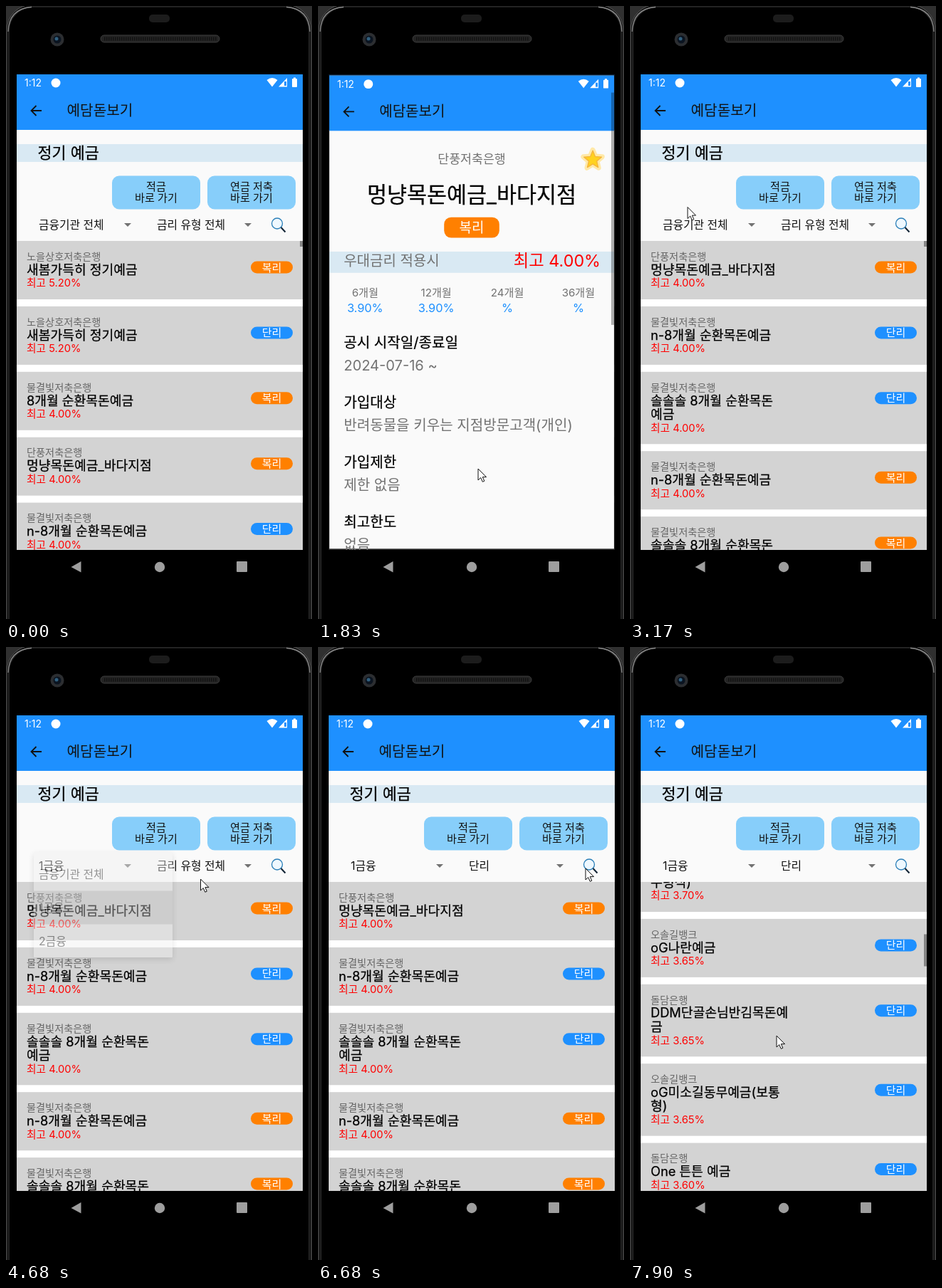
These frames come from a looping animation (430 px wide and 861 px high, 7990 ms). An HTML page:

```html
<!DOCTYPE html>
<html lang="ko">
<head>
<meta charset="utf-8">
<style>
html, body { margin: 0; width: 100%; height: 100%; overflow: hidden; background: #000 }
body > svg { display: block; width: 100%; height: 100% }
text { font-family: Inter, "Noto Sans CJK KR", "Noto Sans CJK", sans-serif; white-space: pre }
text[fill="#000"] { stroke: #000; stroke-width: .25px }
.popup { filter: drop-shadow(0 3px 4px #0004) }
</style>
</head>
<body>
<script>
const BLUE = '#1e90ff', ORANGE = '#ff8000', BAND = '#d9e9f3', GRAY = '#727272', DARK = '#111';
const LOOP = 7990, REST = 7900;

// ---- drawing helpers (y of a text is its visual middle) ----
const text = (x, y, size, str, fill = '#000', anchor = 'start') =>
  `<text x="${x}" y="${y + size * .37}" font-size="${size}" fill="${fill}" text-anchor="${anchor}">${str}</text>`;
const mid = (x, y, size, str, fill) => text(x, y, size, str, fill, 'middle');
const rect = (x, y, w, h, fill, r = 0, more = '') =>
  `<rect x="${x}" y="${y}" width="${w}" height="${h}" rx="${r}" fill="${fill}" ${more}/>`;
const path = (d, fill, more = '') => `<path d="${d}" fill="${fill}" ${more}/>`;
const circle = (x, y, r, fill, more = '') => `<circle cx="${x}" cy="${y}" r="${r}" fill="${fill}" ${more}/>`;
const group = (id, body, more = '') => `<g id="${id}" ${more}>${body}</g>`;

// ---- lists: bank, title lines, rate, compound interest? ----
const listA = [
  ['노을상호저축은행', '새봄가득히 정기예금', '5.20', 1],
  ['노을상호저축은행', '새봄가득히 정기예금', '5.20', 0],
  ['물결빛저축은행', '8개월 순환목돈예금', '4.00', 1],
  ['단풍저축은행', '멍냥목돈예금_바다지점', '4.00', 1],
  ['물결빛저축은행', 'n-8개월 순환목돈예금', '4.00', 0],
  ['물결빛저축은행', '솔솔솔 8개월 순환목돈|예금', '4.00', 0],
  ['물결빛저축은행', 'n-8개월 순환목돈예금', '4.00', 1],
  ['물결빛저축은행', '솔솔솔 8개월 순환목돈|예금', '4.00', 1]
];
const listB = [
  ['여울은행', 'QK 든든목돈예금', '3.90', 0],
  ['파랑은행', 'Lo바닷길목돈|예금', '3.85', 0],
  ['들꽃은행주식회사', 'QV네가Fresh푸른들판|예금', '3.80', 0],
  ['서리은행', 'W목돈예금|(만기수령식)', '3.75', 0],
  ['파랑은행', 'Lo새인연반김예금', '3.75', 0],
  ['여울은행', 'QK 246 목돈예금| (만기한번수령식)', '3.75', 0],
  ['서리은행', 'W새싹목돈예금|(만기한번|수령식)', '3.70', 0],
  ['오솔길뱅크', 'oG나란예금', '3.65', 0],
  ['돌담은행', 'DDM단골손님반김목돈예|금', '3.65', 0],
  ['오솔길뱅크', 'oG미소길동무예금(보통|형)', '3.65', 0],
  ['돌담은행', 'One 튼튼 예금', '3.60', 0]
];

function rows(list) {
  let y = 0;
  return list.map(([bank, title, rate, compound]) => {
    const lines = title.split('|'), extra = 19.5 * (lines.length - 1), top = y;
    y += 91.9 + extra;
    return rect(0, top, 402, 82 + extra, '#d3d3d3') +
      text(14, top + 21.5, 14.2, bank, '#666') +
      lines.map((s, i) => text(14, top + 40 + 19.5 * i, 18.2, s)).join('') +
      text(14, top + 59 + extra, 14.7, `최고 ${rate}%`, '#f00') +
      rect(329, top + 28.5, 59, 17, compound ? ORANGE : BLUE, 8.5) +
      mid(358.5, top + 37, 15, compound ? '복리' : '단리', '#fff');
  }).join('');
}

// ---- screen parts ----
const header = rect(15, 96, 402, 78, BLUE) +
  text(26, 108, 14, '1:12', '#fff') + circle(70, 108, 6.5, '#fff') +
  path('M366.500 104 Q374 98 381.500 104 L374 113.500Z M395 101 V113.500 H383Z', '#fff') +
  path('M391 106 H394 V112 H391Z', BLUE) +
  rect(402, 102, 7, 12, '#fff', 1) + rect(404, 100.5, 3, 2, '#fff') +
  path('M50 147 H36 M42.500 140 L35.500 147 L42.500 154', 'none', `stroke="${DARK}" stroke-width="1.8"`) +
  text(85.5, 146.5, 20.2, '예담돋보기', DARK);

const button = (x, top) => rect(x, 238.5, 124, 47, '#87cefa', 10) +
  mid(x + 62, 253, 15.1, top, DARK) + mid(x + 62, 269.5, 15.1, '바로 가기', DARK);
const arrow = x => path(`M${x - 5} 305 h10 l-5 5Z`, GRAY);

const home = rect(15, 96, 402, 668, '#fafafa') + header +
  rect(15, 194, 402, 25, BAND) + text(44.5, 206, 21.8, '정기 예금') +
  button(149, '적금') + button(283, '연금 저축') +
  text(46, 307, 15.8, '<tspan id="bank"></tspan>', DARK) + arrow(171) +
  text(212, 307, 15.8, '<tspan id="kind"></tspan>', DARK) + arrow(340) +
  circle(381, 305.5, 7.5, '#eef8ff', 'stroke="#2b7fb8" stroke-width="1.3"') +
  path('M386.500 311 L392.500 317.500', 'none', 'stroke="#123" stroke-width="2"') +
  `<svg x="15" y="330" width="402" height="434">` + rect(0, 0, 402, 434, '#fff') +
  group('listA', rows(listA)) + group('listB', rows(listB)) +
  rect(398, 0, 4, 8, '#858585', 0, 'id="thumb"') + '</svg>';

const star = (r, fill, more) => {
  const pts = Array.from({ length: 10 }, (_, i) => {
    const a = i * Math.PI / 5, d = i % 2 ? r * .45 : r;
    return (387 + d * Math.sin(a)).toFixed(1) + ',' + (215 - d * Math.cos(a)).toFixed(1);
  });
  return `<polygon points="${pts}" fill="${fill}" stroke-linejoin="round" ${more}/>`;
};
const rate = (i, value) => mid(65.5 + 100.4 * i, 402, 15.2, [6, 12, 24, 36][i] + '개월', GRAY) +
  mid(65.5 + 100.4 * i, 423.5, 16.4, value + '%', BLUE);
const fact = (i, label, value) => text(35.3, 472.7 + 84.4 * i, 20.2, label) +
  text(35.3, 505.3 + 84.4 * i, 20.2, value, GRAY);

const detail = rect(15, 96, 402, 668, '#fafafa') + header +
  mid(216, 213, 17.4, '단풍저축은행', GRAY) +
  star(14, '#ffe9a8', 'stroke="#ffe9a8" stroke-width="7"') + star(13, '#ffd21f', 'stroke="#f6b73c" stroke-width="1.5"') +
  mid(216, 263.7, 30.6, '멍냥목돈예금_바다지점') +
  rect(177, 296, 78, 29, ORANGE, 10) + mid(216, 310, 19, '복리', '#fff') +
  rect(15, 344.5, 402, 30, BAND) + text(35.3, 357, 20.1, '우대금리 적용시', GRAY) +
  text(398, 356.7, 23.5, '최고 4.00%', '#f00', 'end') +
  rate(0, '3.90') + rate(1, '3.90') + rate(2, '') + rate(3, '') +
  fact(0, '공시 시작일/종료일', '2024-07-16 ~') +
  fact(1, '가입대상', '반려동물을 키우는 지점방문고객(개인)') +
  fact(2, '가입제한', '제한 없음') + fact(3, '최고한도', '없음') +
  rect(413, 120, 4, 328, '#000', 0, 'id="pageThumb"');

const popup = (id, x, w, textX, options) => group(id,
  rect(x, 288, w, 148, '#f0f0f0', 1, 'class="popup"') +
  rect(x, 342.5, w, 47, '#0000002c', 0, `id="${id}Pick"`) +
  options.map((s, i) => text(textX, 319 + 47 * i, 15.8, s, DARK)).join(''));

const phone = rect(0, 0, 430, 861, '#303030') +
  rect(1, -2, 428, 900, '#0b0b0b', 36, 'stroke="#555" stroke-width="1"') +
  rect(4, 1, 422, 900, '#000', 34, 'stroke="#2c2c2c" stroke-width="1.5"') +
  path('M3 36 Q4 4 36 1.500 M427 36 Q426 4 394 1.500', 'none', 'stroke="#8a8a8a" stroke-width="1.3"') +
  rect(201, 12, 29, 11, '#1c1c1c', 5) +
  rect(133, 41, 167, 10, '#242424', 5, 'stroke="#3d3d3d"') +
  path('M138 46 H296', 'none', 'stroke="#111" stroke-width="5" stroke-dasharray="1.5 1.5"') +
  circle(72, 47, 9.5, '#2c2e31') + circle(72, 47, 5.5, '#0b1420') + circle(71, 46, 2.5, '#31607f') +
  path('M105.500 780 V795.500 L91.500 788Z', '#9e9e9e') + circle(216, 788, 7.2, '#9e9e9e') +
  rect(324, 780, 15, 15, '#9e9e9e', 1);

document.body.innerHTML = `<svg viewBox="0 0 430 861" preserveAspectRatio="none">
  <clipPath id="screen">${rect(15, 96, 402, 668, '#000')}</clipPath>
  ${phone}
  <g clip-path="url(#screen)">${home}
  ${rect(15, 96, 402, 668, '#000', 0, 'id="shade"')}${group('detail', detail)}
  ${popup('popA', 39, 195, 46, ['금융기관 전체', '1금융', '2금융'])}
  ${popup('popB', 204, 199, 212, ['금리 유형 전체', '단리', '복리'])}</g>
  ${group('cursor', path('M0 0 V16 L3.700 12.500 L6.300 18.300 L8.800 17.200 L6.300 11.600 H11.500Z', '#fff', 'stroke="#111" stroke-width="1"'))}
</svg>`;

// ---- motion ----
const $ = id => document.getElementById(id);
const ramp = (t, a, b) => Math.min(1, Math.max(0, (t - a) / (b - a)));
const smooth = p => p * p * (3 - 2 * p);
const drag = p => p ** 1.5;
const pulse = (t, inA, inB, outA, outB) => ramp(t, inA, inB) * (1 - ramp(t, outA, outB));
const show = (id, alpha) => $(id).setAttribute('opacity', alpha);
const move = (id, x, y) => $(id).setAttribute('transform', `translate(${x} ${y})`);

// time, x, y, easing towards this point
const route = [
  [440, 270, 834], [1220, 225, 650], [2260, 225, 650], [2620, 95, 775], [2760, 95, 775],
  [3170, 81, 282.5], [3240, 79, 291], [3310, 79, 293], [3390, 80, 302], [3720, 80, 302],
  [4300, 84, 366], [4430, 84, 366], [4680, 273.5, 326], [4760, 270, 308], [4960, 270, 308],
  [5400, 276, 440], [5560, 276, 444], [5860, 262, 366], [6080, 262, 366], [6540, 376, 311],
  [6760, 376, 311], [7200, 235, 597.5], [7380, 235, 597.5], [7550, 227, 373.5, drag],
  [7590, 227, 373.5], [7850, 206, 546]
];

function cursorAt(t) {
  const i = route.findIndex(k => k[0] > t);
  if (i < 0) return route.at(-1).slice(1);
  if (!i) return route[0].slice(1);
  const [t0, x0, y0] = route[i - 1], [t1, x1, y1, ease = smooth] = route[i];
  const p = ease(ramp(t, t0, t1));
  return [x0 + (x1 - x0) * p, y0 + (y1 - y0) * p];
}

// dragged by the pointer, then a decaying fling
function scrollB(t) {
  if (t < 7590) return 224 * drag(ramp(t, 7380, 7550));
  return 224 + 752 * (1 - Math.exp((7590 - t) / 300));
}

function draw(t) {
  const [x, y] = cursorAt(t), filtered = t >= 6720, offset = scrollB(t);
  move('cursor', x, y);
  show('cursor', t < 470 ? 0 : 1);

  show('listA', filtered ? 0 : 1);
  show('listB', filtered ? 1 : 0);
  move('listA', 0, t < 2000 ? 0 : -275.7);
  move('listB', 0, -offset);
  $('thumb').setAttribute('y', filtered ? offset * .1037 : 0);
  $('thumb').setAttribute('height', filtered ? 45 : 8);
  show('thumb', t < 1000 ? 1 - ramp(t, 60, 500) : filtered ? ramp(t, 7380, 7400) : pulse(t, 2000, 2001, 4400, 4620));

  const closing = ramp(t, 2720, 2950);
  const scale = 1 - .15 * (1 - ramp(t, 1620, 2020)) ** 4.5 - .08 * smooth(closing);
  const shown = pulse(t, 1600, 1720, 2720, 2950);
  $('detail').setAttribute('transform', `translate(216 430) scale(${scale}) translate(-216 -430)`);
  show('detail', shown);
  show('shade', t < 2720 ? shown * .8 : 0);
  show('pageThumb', .3 * (1 - ramp(t, 2150, 2500)));

  $('bank').textContent = t < 4450 ? '금융기관 전체' : '1금융';
  $('kind').textContent = t < 5960 ? '금리 유형 전체' : '단리';
  show('popA', pulse(t, 3550, 3760, 4590, 4750));
  show('popAPick', ramp(t, 4330, 4430));
  show('popB', pulse(t, 4860, 5070, 5960, 6140));
  show('popBPick', ramp(t, 5860, 5940));
}

function tick(now) {
  draw(Math.min(now % LOOP, REST));
  requestAnimationFrame(tick);
}
draw(0);
requestAnimationFrame(tick);
</script>
</body>
</html>
```
